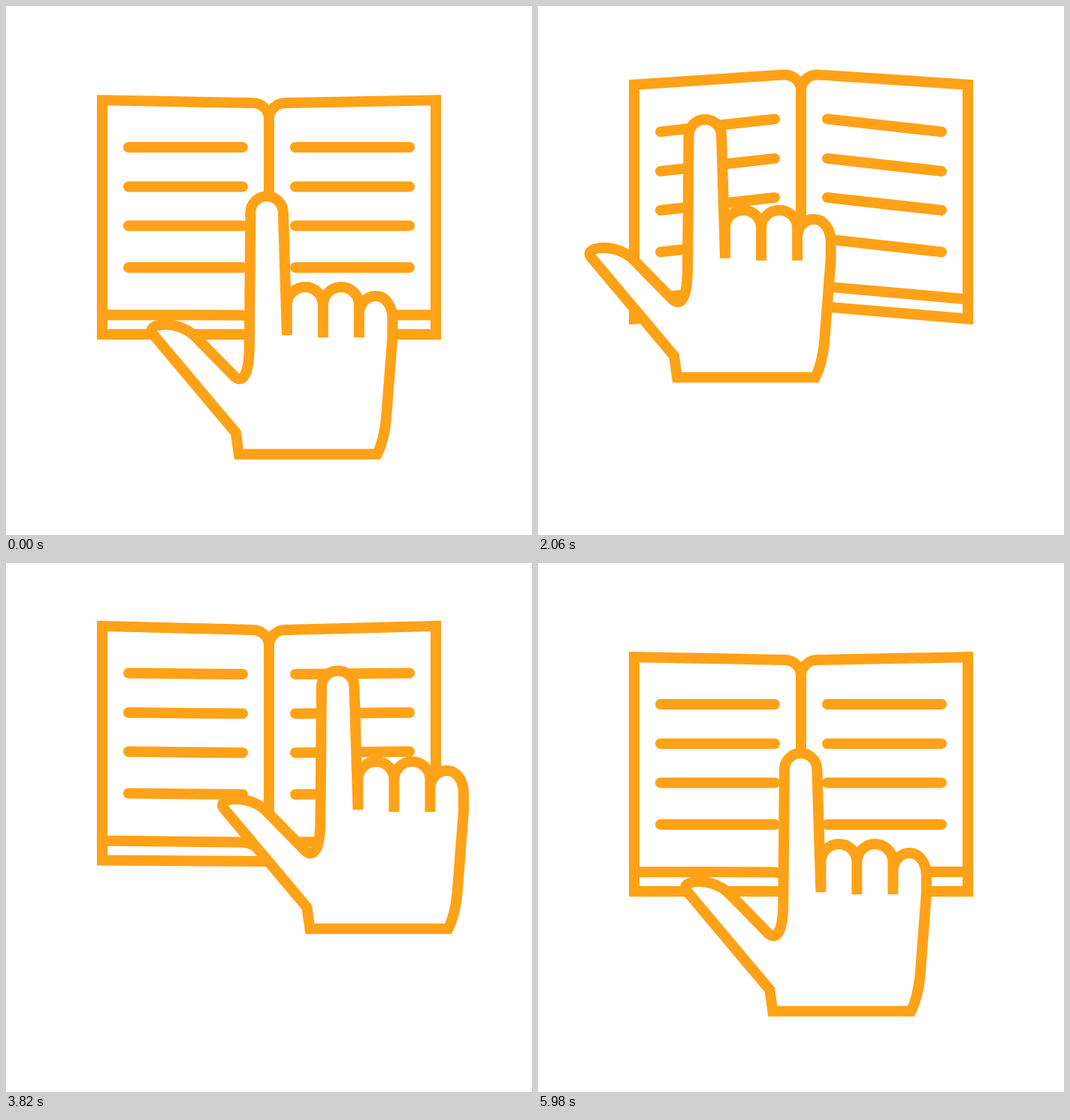
Recreate the animation shown at these times as an HTML page. Size 700 by 704 pixels, loop 6000 ms.

```html
<!DOCTYPE html>
<html lang="en">
<head>
<meta charset="utf-8">
<title>Reading a book</title>
<style>
  html, body { margin: 0; width: 100%; height: 100%; overflow: hidden; background: #fff; }
  svg { display: block; width: 700px; height: 704px; }
</style>
</head>
<body>
<svg viewBox="0 0 700 704" fill="none" stroke="#ffa217" stroke-width="14">
  <defs>
    <path id="track" d="M0,0 C-112,0 -167,-11 -167,-58 C-167,-101 -95,-118.5 0,-118.5
      C95,-118.5 158,-100 158,-58 C158,-11 105,0 0,0"/>
    <g id="page">
      <path id="cover"/>
      <path id="text" stroke-linecap="round"/>
    </g>
  </defs>
  <use href="#page"/>
  <use href="#page" transform="matrix(-1 0 0 1 700 0)"/>
  <path id="hand" fill="#fff" d="M310,596.5 L306,568 L195,436 C190,429 199,424 212,424
    C228,424 244,431 254,442 L304,493 C314,502 324,494 324,450 L325.5,275 A21.7 21.7 0 0 1 369,275
    L374,438 V398 A24 24 0 0 1 422,398 V441 V398 A24 24 0 0 1 470,398 V441 V411
    C470,396 480,386 492,386 C505,386 514.5,399 514.5,416 V440 L506,550 Q503,579 494,596.5 Z"/>
</svg>
<script>
  const LOOP = 6000;
  const [track, cover, text, hand] = ['track', 'cover', 'text', 'hand'].map(id => document.getElementById(id));
  const trackLength = track.getTotalLength();
  const tilts = [0, -22.6, -7.6, 9, 0];   // spine height relative to the outer edge
  const rows = [188, 240.5, 292.5, 348];

  function tiltAt(p) {
    const k = p * 4, i = Math.floor(k);
    return tilts[i] + (tilts[i + 1] - tilts[i]) * (k - i);
  }

  function draw(now) {
    const p = (now % LOOP) / LOOP;
    const inner = -24.2 * (1 - Math.cos(p * 2 * Math.PI));
    const outer = inner - tiltAt(p);
    const a = y => y + outer;
    const b = y => y + inner;

    cover.setAttribute('d',
      `M350,${b(423)} V${b(150)} C350,${b(138)} 340,${b(129)} 328,${b(129)}
       L128,${a(125.3)} V${a(437)} L328,${b(437)} H350
       M128,${a(411)} L312,${b(411.5)} C330,${b(411.5)} 336,${b(423)} 350,${b(423)}`);
    text.setAttribute('d', rows.map(y => `M163,${a(y)} L315,${b(y)}`).join(' '));

    const pos = track.getPointAtLength(p * trackLength);
    hand.setAttribute('transform', `translate(${pos.x} ${pos.y})`);
  }

  const start = performance.now();
  function tick() {
    draw(performance.now() - start);
    requestAnimationFrame(tick);
  }
  tick();
</script>
</body>
</html>
```
